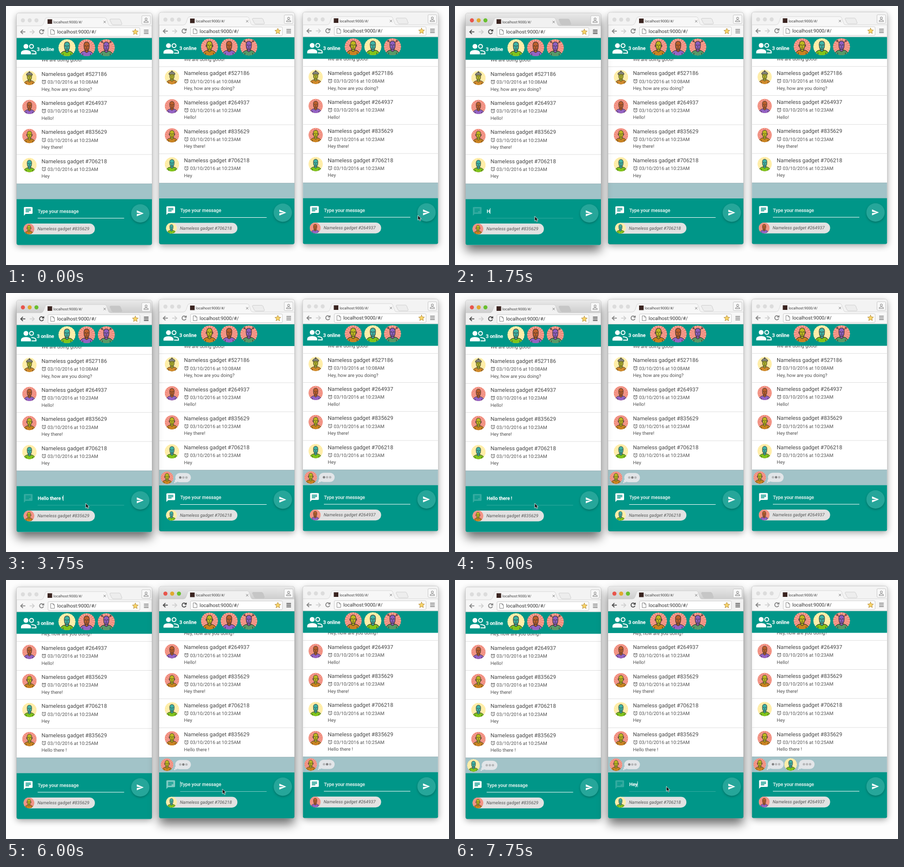
Animation, 917 px wide and 537 px high, one loop 8 s. Source, as an HTML page:

```html
<!DOCTYPE html>
<html lang="en">
<head>
<meta charset="utf-8">
<title>Chat in three windows</title>
<style>
html, body { margin: 0; width: 100%; height: 100%; overflow: hidden; background: #fdfdfd; }
svg { display: block; width: 917px; height: 537px; }
text { font-family: Roboto, "Liberation Sans", sans-serif; text-rendering: geometricPrecision; white-space: pre; }
.name { font-size: 11.25px; fill: #464646; }
.small { font-size: 9.8px; fill: #525252; }
.chip { font-size: 9.2px; font-style: italic; fill: #555; }
.input { font-size: 9.75px; font-weight: 500; color: #fff; fill: currentColor; stroke: currentColor; stroke-width: .3; }
</style>
</head>
<body>
<svg id="stage" viewBox="0 0 917 537" xmlns="http://www.w3.org/2000/svg"></svg>
<script>
const STEP = 250, LOOP = 8000;
const stage = document.getElementById('stage');

const ICON = {
  chat: 'M20 2H4c-1.1 0-2 .9-2 2v18l4-4h14c1.1 0 2-.9 2-2V4c0-1.1-.9-2-2-2zM6 9h12v2H6V9zm8 5H6v-2h8v2zm4-6H6V6h12v2z',
  send: 'M2 21L23 12 2 3v7l15 2-15 2z',
  alarm: 'M22 5.7l-4.6-3.85-1.3 1.55 4.6 3.85zM7.9 3.4L6.6 1.85 2 5.7l1.3 1.55zM12.5 8H11v6l4.75 2.85.75-1.23-4-2.37zM12 4a9 9 0 1 0 0 18a9 9 0 0 0 0-18zm0 16a7 7 0 1 1 0-14a7 7 0 0 1 0 14z'
};

// id: background, ray, head, body, extra part
const ROBOTS = {
  olive:  ['#ee8272', '#f6a497', '#bdb81f', '#c98320', 'ears'],
  rust:   ['#ee8272', '#f6a497', '#bd5f2c', '#9463c4', 'plain'],
  teal:   ['#ffeb9c', '#fff0b4', '#3fb3a6', '#80c41c', 'plain'],
  hat:    ['#ffeb9c', '#fff0b4', '#b3b52a', '#d08a2c', 'hat'],
  violet: ['#ee8272', '#f6a497', '#8c5dbd', '#579a68', 'horns']
};
const NAMES = {
  hat: 'Nameless gadget #527186',
  rust: 'Nameless gadget #264937',
  olive: 'Nameless gadget #835629',
  teal: 'Nameless gadget #706218'
};
const PARTS = {
  plain: '',
  ears: '<path d="M-16-11h-4v9h4M16-11h4v9h-4"/>',
  hat: '<path fill="#8b8b80" d="M-22-20Q-20-37 0-38Q20-37 22-20z"/><circle cy="-41" r="4" fill="#8b8b80"/>',
  horns: '<path d="M-13-24L-25-34M13-24L25-34"/><circle cx="-26" cy="-35" r="3" fill="#8c5dbd"/><circle cx="26" cy="-35" r="3" fill="#8c5dbd"/>'
};

const WINDOWS = [
  { dx: 0, dy: 0, me: 'olive', online: ['teal', 'rust', 'violet'] },
  { dx: 295, dy: -1.5, me: 'teal', online: ['olive', 'rust', 'violet'] },
  { dx: 592.5, dy: -2, me: 'rust', online: ['olive', 'teal', 'violet'] }
];

const MESSAGES = [
  ['olive', '10:08', 'We are doing good!'],
  ['hat', '10:08', 'Hey, how are you doing?'],
  ['rust', '10:23', 'Hello!'],
  ['olive', '10:23', 'Hey there!'],
  ['teal', '10:23', 'Hey'],
  ['olive', '10:25', 'Hello there !']
];

function icon(name, x, y, scale, fill, attrs = '') {
  return `<path d="${ICON[name]}" transform="translate(${x} ${y}) scale(${scale})" fill="${fill}" ${attrs}/>`;
}

function avatar(id, cx, cy, r) {
  return `<use href="#${id}" x="${cx - r}" y="${cy - r}" width="${2 * r}" height="${2 * r}"/>`;
}

function robotSymbol(id) {
  const [bg, ray, head, body, part] = ROBOTS[id];
  let rays = '';
  for (let i = 0; i < 20; i++) {
    rays += `<path d="M0 0L-5-62H5z" fill="${ray}" transform="rotate(${i * 18})"/>`;
  }
  return `<symbol id="${id}" viewBox="-50 -50 100 100"><g clip-path="url(#disc)">
    <circle r="50" fill="${bg}"/>${rays}
    <g stroke="#33302a" stroke-width="3" fill="none">
      <path fill="${body}" d="M-42 52Q-40 24-12 19L0 26L12 19Q40 24 42 52z"/>
      <path fill="${head}" d="M-9 10V23L0 29L9 23V10"/>
      <path fill="${head}" d="M-16-13Q-16-34 0-34Q16-34 16-13L14 5Q10 17 0 17Q-10 17-14 5z"/>
      <path d="M-11-11h8M3-11h8M0-8v8M-7 7h14M-23 34v16M23 34v16"/>${PARTS[part]}
    </g></g></symbol>`;
}

function rows(first) {
  return MESSAGES.slice(first, first + 5).map(([who, time, text], i) => {
    const y = 127.3 + 60.2 * (i - 1);
    return `<path d="M22 ${y}h280" stroke="#dedede"/>
      ${avatar(who, 48.5, y + 21.8, 14.8)}
      <text class="name" x="73.5" y="${y + 17.6}">${NAMES[who]}</text>
      ${icon('alarm', 73.3, y + 24.8, 0.43, '#525252')}
      <text class="small" x="86" y="${y + 33.8}">03/10/2016 at ${time}AM</text>
      <text class="small" x="73.6" y="${y + 48.2}">${text}</text>`;
  }).join('');
}

function bubble(who, i) {
  const x = 38.3 + 64 * i;
  const dots = [0, 1, 2].map(k =>
    `<circle class="dot" cx="${x + 27.4 + 6.4 * k}" cy="384" r="2.5" fill="#777"/>`).join('');
  return `<g class="bubble">${avatar(who, x, 384.4, 13)}
    <rect x="${x + 17}" y="374.7" width="32.5" height="19" rx="9.5" fill="#e2e5e8"/>
    <circle cx="${x + 19}" cy="391" r="3" fill="#e2e5e8"/>
    <circle cx="${x + 16}" cy="394.5" r="1.4" fill="#e2e5e8"/>${dots}</g>`;
}

function people() {
  return `<g fill="#fff"><circle cx="41.3" cy="83.8" r="5"/>
    <path d="M31 100.3V97Q31 91.6 41.3 91.2Q51.6 91.6 51.6 97V100.3z"/></g>
    <g fill="none" stroke="#fff" stroke-width="2"><circle cx="52.8" cy="83.8" r="4"/>
    <path d="M52.5 92.3Q62 93 62 97V99.3H53"/></g>`;
}

function chrome() {
  return `<path class="bar" d="M22 41V20q0-5 5-5h270q5 0 5 5v21z"/>
    <circle class="light" cx="35" cy="29.7" r="4.2"/><circle class="light" cx="49" cy="29.7" r="4.2"/><circle class="light" cx="63" cy="29.7" r="4.2"/>
    <path class="plus" d="M217 27h17q2 0 3 2l3 8q0 2-2 2h-16q-2 0-3-2l-4-8q0-2 2-2z" stroke="#c2c2c2" stroke-width=".7"/>
    <path class="tool" d="M22 41H72q4 0 6-5l3-9q1-3 4-3h119q3 0 4 3l4 11q1 3 5 3h85v26H22z" stroke="#c4c4c4" stroke-width=".6"/>
    <rect x="86" y="27.5" width="9.5" height="9.5" fill="#3a2420"/>
    <text x="98" y="35.5" font-size="7.5" fill="#444">localhost:9000/#/</text>
    <path d="M202 30.8l4.6 4.6m0-4.6l-4.6 4.6" stroke="#777" stroke-width="1"/>
    <rect x="281" y="20" width="18" height="18" rx="2" fill="#f8f8f8" stroke="#bdbdbd" stroke-width=".8"/>
    <g fill="none" stroke="#777" stroke-width="1"><circle cx="290" cy="27" r="2.2"/><path d="M285.5 34v-1q0-2 4.5-2.4q4.5.4 4.5 2.4v1z"/></g>
    <g class="nav" fill="none" stroke-width="1.8">
      <path d="M40 53.7h-9.5m4.5-4.3l-4.5 4.3l4.5 4.3"/>
      <path d="M77.2 51.2a4.2 4.2 0 1 0 .4 3.6M78.2 48.5v3.4h-3.6"/>
      <path d="M285.5 50.2h9.5m-9.5 3.5h9.5m-9.5 3.5h9.5"/>
    </g>
    <path d="M49 53.7h9.5m-4.5-4.3l4.5 4.3l-4.5 4.3" fill="none" stroke="#cfcfcf" stroke-width="1.8"/>
    <rect x="87" y="45" width="190" height="18" rx="2" fill="#fff" stroke="#bcbcbc" stroke-width=".8"/>
    <path d="M92.5 48.8h5l2.8 2.8v7.2h-7.8zM97.5 48.8v2.8h2.8" fill="#fff" stroke="#777" stroke-width=".9"/>
    <text x="105.7" y="57.4" font-size="10.15" fill="#333">localhost:9000/#/</text>
    <path d="M267.7 47.6l1.8 4 4.3.4-3.3 2.9 1 4.3-3.8-2.3-3.8 2.3 1-4.3-3.3-2.9 4.3-.4z" fill="#f9d568" stroke="#b08a3e" stroke-width=".9"/>
    <path d="M22 66.2h280" stroke="#b4b4b4" stroke-width=".8"/>`;
}

function windowMarkup({ dx, dy, me, online }, i) {
  const others = [['teal'], ['olive'], ['olive', 'teal']][i];
  return `<g class="win" transform="translate(${dx} ${dy})">
    <rect class="shade" x="22" y="15" width="280" height="480" rx="5"/>
    <rect x="21.7" y="14.7" width="280.6" height="481" rx="4.5" fill="#fff" stroke="#000" stroke-opacity=".22" stroke-width=".8"/>
    <g clip-path="url(#frame)">
      ${chrome()}
      <rect x="22" y="111" width="280" height="258" fill="#fff"/>
      <g clip-path="url(#list)"><g class="before">${rows(0)}</g><g class="after">${rows(1)}
        <rect class="scroll" x="295.4" y="324" width="4.8" height="43" rx="2.4" fill="#b8b8b8"/></g></g>
      <rect x="22" y="66.5" width="280" height="45" fill="#009688"/>
      ${people()}
      <text class="input" x="64" y="92.7" style="font-size:10px">3 online</text>
      ${online.map((id, k) => avatar(id, 126.2 + 40.7 * k, 86.5, 17.6)).join('')}
      <rect x="22" y="368.5" width="280" height="33" fill="#a2c3c8"/>
      <path d="M22 368.7h280" stroke="#8fa9ad" stroke-opacity=".7"/>
      ${others.map(bubble).join('')}
      <rect x="22" y="400.5" width="280" height="96" fill="#009688"/>
      ${icon('chat', 35.2, 414.9, 0.9, '#fff', 'class="fade"')}
      <text class="input field" x="65.8" y="428.7"></text>
      <path class="caret" d="M0 419v12" stroke="#fff" stroke-width=".9"/>
      <path class="fade" d="M65.5 440h179" stroke="#fff" stroke-width="1.1"/>
      <circle cx="278" cy="432" r="19" fill="#003d36" opacity=".4" filter="url(#soft)"/>
      <circle cx="278" cy="430" r="19" fill="#26a69a"/>
      ${icon('send', 269.4, 421.8, 0.68, '#fff')}
      <rect x="36.5" y="451" width="147.5" height="22.4" rx="11.2" fill="#e2e2e2"/>
      ${avatar(me, 47.5, 462.2, 11.2)}
      <text class="chip" x="65" y="465.2">${NAMES[me]}</text>
    </g></g>`;
}

stage.innerHTML = `<defs>
  <clipPath id="disc"><circle r="50"/></clipPath>
  <clipPath id="frame"><rect x="22" y="15" width="280" height="480.5" rx="4"/></clipPath>
  <clipPath id="list"><rect x="22" y="111" width="280" height="257.5"/></clipPath>
  <linearGradient id="title" x2="0" y2="1"><stop stop-color="#e9e9e9"/><stop offset="1" stop-color="#cecece"/></linearGradient>
  <filter id="soft" x="-30%" y="-30%" width="160%" height="160%"><feGaussianBlur stdDeviation="2"/></filter>
  <filter id="near" x="-20%" y="-20%" width="140%" height="140%"><feOffset dy="4"/><feGaussianBlur stdDeviation="7"/></filter>
  <filter id="far" x="-25%" y="-20%" width="150%" height="140%"><feOffset dy="12"/><feGaussianBlur stdDeviation="11"/></filter>
  ${Object.keys(ROBOTS).map(robotSymbol).join('')}</defs>
  <rect width="917" height="537" fill="#fdfdfd"/>
  <g id="windows">${WINDOWS.map(windowMarkup).join('')}</g>
  <path id="cursor" d="M0 0V10L2.3 7.9L4 11.6L5.9 10.8L4.2 7.2H7.3z" fill="#111" stroke="#fff" stroke-width=".8"/>`;

const layer = document.getElementById('windows');
const cursor = document.getElementById('cursor');
const wins = [...layer.children].map(el => {
  const all = q => [...el.querySelectorAll(q)];
  const one = q => el.querySelector(q);
  return {
    el, shade: one('.shade'), bar: one('.bar'), tool: one('.tool'), plus: one('.plus'), nav: one('.nav'),
    lights: all('.light'), fades: all('.fade'), field: one('.field'), caret: one('.caret'),
    before: one('.before'), after: one('.after'), scroll: one('.scroll'),
    bubbles: all('.bubble').map(b => ({ el: b, dots: [...b.querySelectorAll('.dot')] }))
  };
});

const show = (el, on) => el.setAttribute('display', on ? 'inline' : 'none');
const within = (s, a, b) => s >= a && s < b;

// [step, x, y]
const PATH = [[0, 852.5, 434], [4, 165, 436], [21, 165, 436], [23, 459, 435], [24, 448, 433.5], [28, 437.5, 428]];
function cursorAt(s) {
  const k = PATH.findIndex(p => p[0] > s);
  if (k < 0) return PATH[PATH.length - 1].slice(1);
  const [a, b] = [PATH[k - 1], PATH[k]];
  const u = (s - a[0]) / (b[0] - a[0]);
  const e = u * u * (3 - 2 * u);
  return [a[1] + (b[1] - a[1]) * e, a[2] + (b[2] - a[2]) * e];
}

function typed(s, i) {
  if (i === 0 && within(s, 7, 21)) {
    const early = [1, 3, 6, 7, 9];
    return 'Hello there !'.slice(0, s < 12 ? early[s - 7] : s - 2);
  }
  if (i === 1 && s >= 29) return 'Hey'.slice(0, s - 28);
  return '';
}

function caretOn(s, i) {
  if (i === 0) return within(s, 5, 16) || within(s, 18, 20);
  return i === 1 && (within(s, 24, 26) || s >= 28);
}

function fadeLevel(s, i) {
  if (i === 0) return s === 4 ? 0.55 : within(s, 5, 24) ? 0.2 : 1;
  if (i === 1) return s === 24 ? 0.5 : s > 24 ? 0.2 : 1;
  return 1;
}

let front = -2;
function setFront(active) {
  if (active === front) return;
  front = active;
  wins.forEach((w, i) => {
    const on = i === active;
    w.shade.setAttribute('filter', on ? 'url(#far)' : 'url(#near)');
    w.shade.setAttribute('opacity', on ? 0.6 : 0.36);
    w.bar.setAttribute('fill', on ? 'url(#title)' : '#f3f3f3');
    w.tool.setAttribute('fill', on ? '#f1f1f1' : '#f7f7f7');
    w.plus.setAttribute('fill', on ? '#c6c6c6' : '#ededed');
    w.nav.setAttribute('stroke', on ? '#4c4c4c' : '#858585');
    w.lights.forEach((l, k) => l.setAttribute('fill', on ? ['#e8554c', '#e0a92e', '#68bf2e'][k] : '#dcdcdc'));
  });
  wins.forEach(w => layer.append(w.el));
  if (active >= 0) layer.append(wins[active].el);
}

function draw(s) {
  setFront(s < 4 ? -1 : s < 24 ? 0 : 1);
  const [cx, cy] = cursorAt(s);
  cursor.setAttribute('transform', `translate(${cx} ${cy})`);
  const sent = s >= 21;
  const lit = [1, 2, 0, 0][s % 4];
  wins.forEach((w, i) => {
    show(w.before, !sent);
    show(w.after, sent);
    show(w.scroll, s < 24);
    const text = typed(s, i);
    w.field.textContent = text || 'Type your message';
    w.field.style.color = text ? '#fff' : '#cde9e5';
    w.fades.forEach(f => f.setAttribute('opacity', fadeLevel(s, i)));
    show(w.caret, caretOn(s, i));
    const end = text ? w.field.getComputedTextLength() : 0;
    w.caret.setAttribute('transform', `translate(${66 + end} 0)`);
    w.bubbles.forEach((b, k) => {
      const start = i === 0 || k === 1 ? 31 : 9;
      show(b.el, s >= start);
      b.dots.forEach((d, j) => d.setAttribute('opacity', s > start && j === lit ? 0.9 : 0.42));
    });
  });
}

let last = -1;
const origin = performance.now();
function tick() {
  const s = Math.floor(((performance.now() - origin) % LOOP) / STEP);
  if (s !== last) draw(last = s);
  requestAnimationFrame(tick);
}
tick();
</script>
</body>
</html>
```
